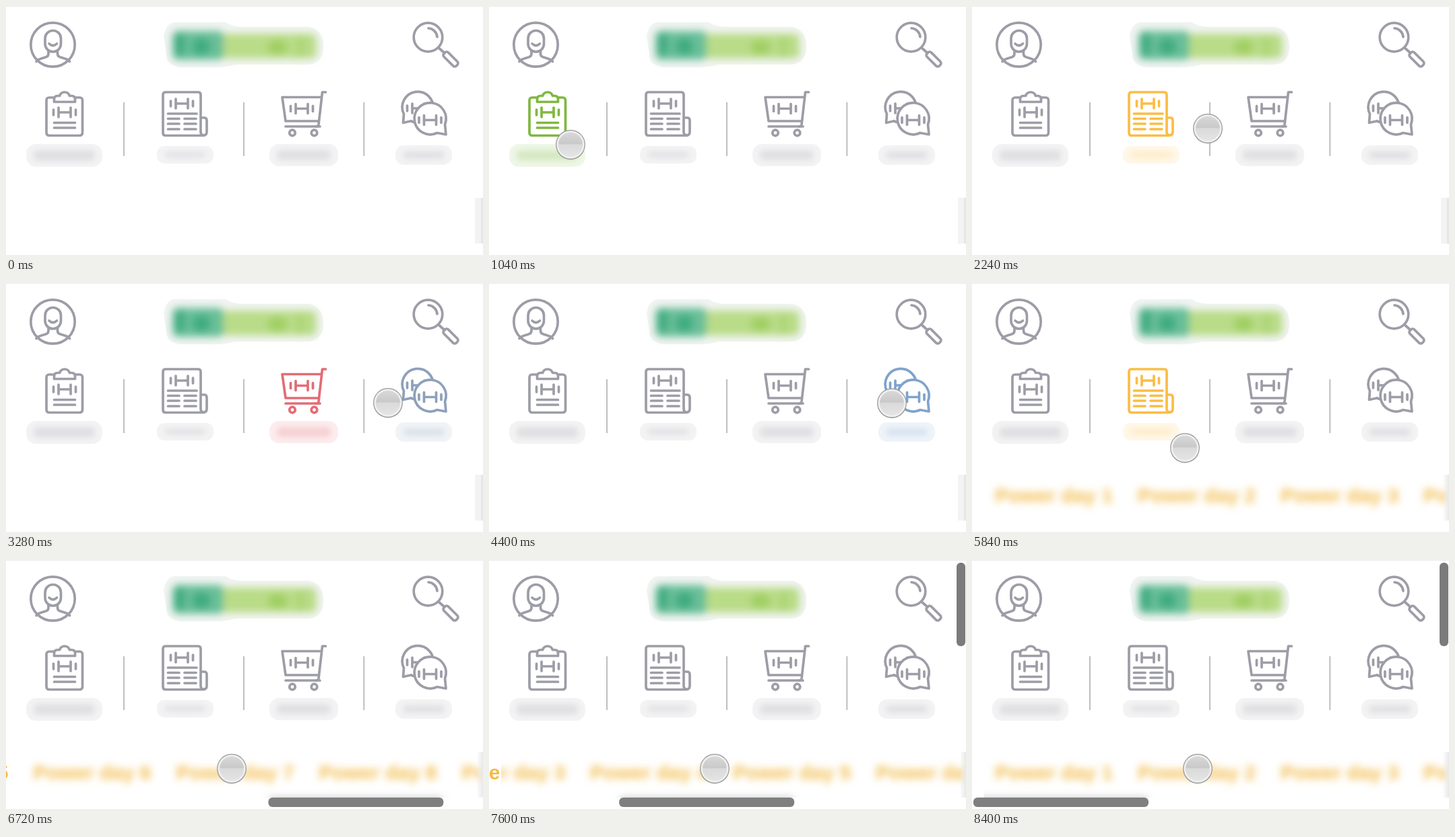
Recreate the animation shown at these times as an HTML page. Size 708 px wide and 370 px high, loop 8.48 s.

```html
<!DOCTYPE html>
<html lang="en">
<head>
<meta charset="utf-8">
<style>
  html, body { margin: 0; width: 100%; height: 100%; overflow: hidden; background: #fff; }
  svg { display: block; width: 708px; height: 370px; color: #9d9da7; }
  .line { fill: none; stroke: currentColor; stroke-width: 3.7; stroke-linecap: round; stroke-linejoin: round; }
  .solid { fill: #fff; }
  .ticker { font: bold 30px "Liberation Sans", Arial, sans-serif; fill: #f2bb48; }
</style>
</head>
<body>
<svg viewBox="0 0 708 370">
  <defs>
    <filter id="soft" filterUnits="userSpaceOnUse" x="-40" y="0" width="790" height="410"><feGaussianBlur stdDeviation="6"/></filter>
    <filter id="mist" filterUnits="userSpaceOnUse" x="0" y="190" width="708" height="60"><feGaussianBlur stdDeviation="4"/></filter>
    <clipPath id="blurArea"><path d="M18 285H708V353H18Z"/></clipPath>
    <clipPath id="sharpArea"><path d="M0 285H18V353H0Z"/></clipPath>
    <linearGradient id="knob" x2="0" y2="1">
      <stop offset="0" stop-color="#d8d8d8"/><stop offset=".46" stop-color="#c9c9c9"/>
      <stop offset=".5" stop-color="#dadada"/><stop offset="1" stop-color="#e4e4e4"/>
    </linearGradient>
    <linearGradient id="edge"><stop offset="0" stop-color="#eee" stop-opacity=".3"/><stop offset="1" stop-color="#e8e8e8"/></linearGradient>
    <g id="dumbbell"><path d="M-9 0H9M-9-7V7M9-7V7M-16.5-4V4M16.5-4V4"/></g>
  </defs>

  <path d="M0 .5H708" stroke="#ececec"/>
  <g fill="none" stroke="#b9b9bd" stroke-width="1.8"><path d="M175 143V223M353 143V223M531.3 143V223"/></g>

  <!-- profile -->
  <g class="line">
    <circle cx="69.5" cy="57.5" r="32.7"/>
    <rect x="58" y="36.5" width="23.5" height="31.5" rx="11.7"/>
    <path d="M64 56Q69.7 61.5 75.5 56M63 67v4q0 4-4 5l-8 2.5q-4 1-6 4M76.500 67v4q0 4 4 5l8 2.500q4 1 6 4"/>
  </g>

  <!-- search -->
  <g class="line">
    <circle cx="626.500" cy="46.500" r="21.300"/>
    <path d="M627 33A14 14 0 0 1 640 46M642 62L651 70"/>
    <rect x="-13" y="-4.500" width="26" height="9" rx="3.500" transform="translate(660 79)rotate(45)"/>
  </g>

  <!-- blurred heading -->
  <path d="M250 24H326Q336 31 350 31H450Q471 36 471 60T450 87H340Q325 92 300 91H258Q237 88 238 70L234 45Q237 26 250 24Z" fill="#f1f4f2"/>
  <g filter="url(#soft)">
    <rect x="318" y="41" width="143" height="37" rx="8" fill="#b9dc88"/>
    <rect x="247" y="37" width="76" height="43" rx="8" fill="#69bf99"/>
    <ellipse cx="258" cy="57" rx="8" ry="18" fill="#41ac81"/>
    <ellipse cx="290" cy="60" rx="14" ry="13" fill="#41ac81"/>
    <ellipse cx="403" cy="61" rx="15" ry="11" fill="#a0cf62"/>
    <path d="M437 46V76" stroke="#a9d46e" stroke-width="9"/>
  </g>

  <g class="tab">
    <g class="line">
      <rect x="60" y="136" width="53.500" height="56.500" rx="4"/>
      <path class="solid" d="M71.500 142.500v-4q0-5 5-5h3q2-5.500 7.500-5.500t7.500 5.500h3q5 0 5 5v4z"/>
      <use href="#dumbbell" x="87" y="158"/>
      <path d="M71.500 173.500H102.500M71.500 181H102.500"/>
    </g>
  </g>
  <g class="tab">
    <g class="line">
      <path d="M294 192.500H237q-4 0-4-4V132q0-4 4-4h48q4 0 4 4v55q0 5 4.500 5t4.500-5V170q0-4-4-4h-5"/>
      <use href="#dumbbell" x="261" y="145"/>
      <path d="M240.500 160H283M240.500 167.500H257M265 167.500H282M240.500 175H257M265 175H282M240.500 183H257M265 183H282"/>
    </g>
  </g>
  <g class="tab">
    <g class="line">
      <path d="M468 135.500H410L415 171H463.500M474.500 128h-5l-5.500 48q-.500 3-3 3H415"/>
      <path d="M460 179H466"/>
      <circle cx="425" cy="188.500" r="4.300"/><circle cx="457.500" cy="188.500" r="4.300"/>
      <use href="#dumbbell" x="439" y="152.500"/>
    </g>
  </g>
  <g class="tab">
    <g class="line">
      <path d="M601 171L589.500 173.500L590.500 160.500A23 23 0 1 1 601 171"/>
      <use href="#dumbbell" x="612" y="152"/>
      <path class="solid" d="M651.500 176L653 191L640 188.500A23.500 23.500 0 1 1 651.500 176"/>
      <use href="#dumbbell" x="629.500" y="169.500"/>
    </g>
  </g>

  <!-- ticker -->
  <g id="sideStrip"><path d="M696 285H708V353H696Z" fill="#f3f3f3"/><path d="M705 285H708V353H705Z" fill="#e6e6e6"/></g>
  <g id="band">
    <g clip-path="url(#blurArea)"><g filter="url(#soft)">
      <g id="ticker" class="ticker"></g>
      <rect class="thumb" y="353" width="260" height="14" rx="6" fill="#7f7f7f" opacity=".45"/>
    </g></g>
    <g clip-path="url(#sharpArea)"><use href="#ticker"/></g>
    <path d="M700 285H708V353H700Z" fill="url(#edge)"/>
  </g>
  <rect class="thumb" y="353" width="260" height="14" rx="6" fill="#7f7f7f"/>
  <rect id="pageThumb" x="694" y="4" width="13" height="124" rx="6" fill="#7b7b7b"/>

  <g id="cursor">
    <circle cy="1" r="21.500" fill="#777" opacity=".55"/>
    <circle r="21.300" fill="#efefef" stroke="#999" stroke-width="1.200"/>
    <circle r="18" fill="url(#knob)"/>
  </g>
</svg>

<script>
const LOOP = 8480, STEP = 80, ITEM_GAP = 212, SCROLL_RATIO = 2.72;
const svg = document.querySelector("svg");
const byId = id => document.getElementById(id);
const clamp = v => Math.max(0, Math.min(1, v));
const ramp = (t, start, end) => clamp((t - start) / (end - start));
const easeOut = (p, power) => 1 - (1 - p) ** power;
const show = (node, on) => node.setAttribute("visibility", on ? "visible" : "hidden");

// Label box is x, y, width, height; each span is the time the tab is hovered.
const tabs = [
  { color: "#7fb840", label: [30, 205, 113, 34], spans: [[880, 1840]] },
  { color: "#fbbd45", label: [224, 208, 84, 26], spans: [[2000, 2320], [4800, 5840]] },
  { color: "#e36c75", label: [391, 205, 102, 33], spans: [[2320, 3280], [4560, 4720]] },
  { color: "#7fa3cd", label: [578, 207, 84, 29], spans: [[3200, 4480]] }
];

// Time, x, y
const cursorPath = [
  [720, 333, 360], [800, 295, 328], [960, 160, 232], [1040, 121, 206], [1200, 107, 193],
  [1600, 107, 193], [1760, 130, 190], [2000, 220, 184], [2240, 350, 182], [2480, 484, 181], [2640, 521, 180],
  [2800, 523, 180], [3040, 533, 179], [3280, 567, 178], [3440, 612, 178],
  [4320, 612, 178], [4480, 584, 179], [4800, 420, 181], [5040, 311, 182], [5200, 300, 182],
  [5680, 300, 182], [5840, 316, 245], [6000, 335, 310], [LOOP, 335, 310]
];

function addSvg(parent, tag, attributes, text = "") {
  const node = document.createElementNS("http://www.w3.org/2000/svg", tag);
  for (const name in attributes) node.setAttribute(name, attributes[name]);
  node.textContent = text;
  parent.append(node);
}

document.querySelectorAll(".tab").forEach((node, i) => {
  const [x, y, width, height] = tabs[i].label;
  tabs[i].node = node;
  addSvg(node, "rect", { x, y, width, height, rx: height / 2.3, fill: "currentColor", opacity: .12 });
  addSvg(node, "rect", { x: x + 11, y: y + 9, width: width - 22, height: height - 18, rx: 6,
    fill: "currentColor", opacity: .22, filter: "url(#mist)" });
});
for (let i = 0; i < 9; i++) addSvg(byId("ticker"), "text", { x: 34 + i * ITEM_GAP, y: 326 }, `Power day ${i + 1}`);

function cursorAt(t) {
  const next = Math.max(1, cursorPath.findIndex(key => key[0] > t));
  const a = cursorPath[next - 1], b = cursorPath[next];
  const p = ramp(t, a[0], b[0]);
  return [a[1] + (b[1] - a[1]) * p, a[2] + (b[2] - a[2]) * p];
}

function thumbAt(t) {
  return 2 + 407 * easeOut(ramp(t, 6320, 7200), 5)
    - 221 * easeOut(ramp(t, 7200, 7760), 3)
    - 186 * easeOut(ramp(t, 7840, 8400), 3);
}

function draw(t) {
  for (const { node, color, spans } of tabs) {
    const level = Math.max(...spans.map(([on, off]) => ramp(t, on, on + 160) * (1 - ramp(t, off, off + 240))));
    node.style.color = `color-mix(in srgb, ${color} ${level * 100}%, #9d9da7)`;
  }
  const thumbX = thumbAt(t);
  byId("ticker").setAttribute("transform", `translate(${(2 - thumbX) * SCROLL_RATIO})`);
  byId("band").setAttribute("opacity", ramp(t, 5200, 5520));
  byId("sideStrip").setAttribute("opacity", 1 - ramp(t, 5200, 5520));
  document.querySelectorAll(".thumb").forEach(node => {
    node.setAttribute("x", thumbX);
    show(node, t >= 6400);
  });
  show(byId("pageThumb"), t >= 7280);
  show(byId("cursor"), t >= 720);
  byId("cursor").setAttribute("transform", `translate(${cursorAt(t)})`);
}

const startTime = performance.now();
function frame() {
  const t = (performance.now() - startTime) % LOOP;
  draw(Math.floor(t / STEP) * STEP);
  requestAnimationFrame(frame);
}
frame();
</script>
</body>
</html>
```
